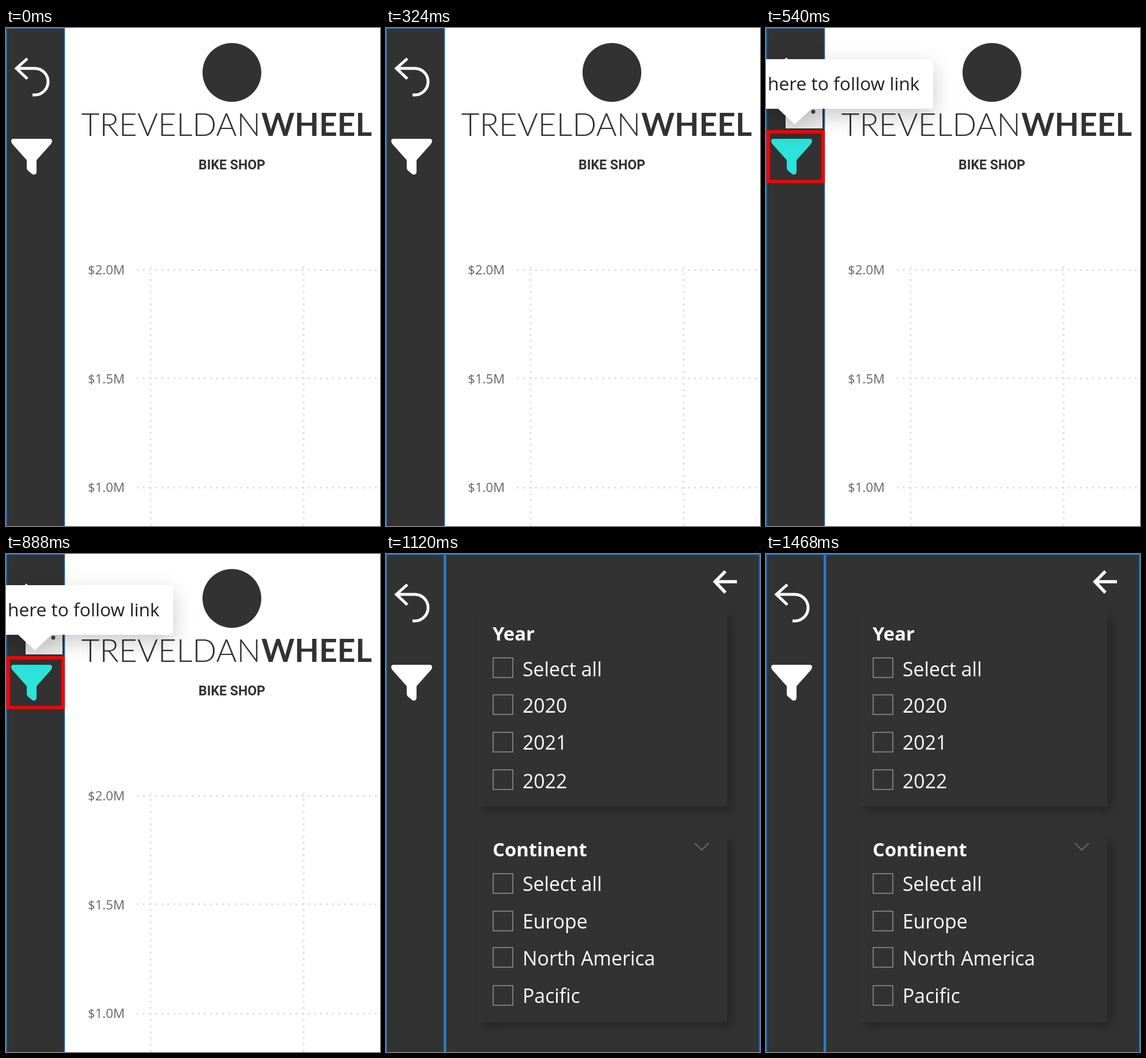
An HTML page with a canvas for the animation above (1.7 s loop, 649 by 863 pixels).

```html
<!DOCTYPE html>
<html lang="en">
<head>
<meta charset="utf-8">
<title>Report filter pane</title>
<style>
  html, body { margin: 0; width: 100%; height: 100%; overflow: hidden; background: #fff; }
  canvas { display: block; width: 649px; height: 863px; }
</style>
</head>
<body>
<canvas width="649" height="863"></canvas>
<script>
const W = 649, H = 863, LOOP = 1700;
const HOVER_AT = 540, PANE_AT = 1120;
const DARK = '#323232', BLUE = '#1068c4', CYAN = '#2ce2d9';
const SANS = '"Open Sans", "Noto Sans", sans-serif';
const ctx = document.querySelector('canvas').getContext('2d');

function rect(x, y, w, h, color) {
  ctx.fillStyle = color;
  ctx.fillRect(x, y, w, h);
}

function text(str, x, y, font, color, align = 'left') {
  ctx.font = font;
  ctx.fillStyle = color;
  ctx.textAlign = align;
  ctx.fillText(str, x, y);
}

function stroke(path, color, width) {
  ctx.strokeStyle = color;
  ctx.lineWidth = width;
  ctx.stroke(new Path2D(path));
}

function withShadow(color, blur, dx, dy, draw) {
  ctx.save();
  ctx.shadowColor = color;
  ctx.shadowBlur = blur;
  ctx.shadowOffsetX = dx;
  ctx.shadowOffsetY = dy;
  draw();
  ctx.restore();
}

function undoIcon() {
  stroke('M37 53 L18 70 L37 88 M18 70 H50 A23 23 0 0 1 50 116 H46', '#fff', 5);
}

function funnelIcon(color) {
  ctx.fillStyle = color;
  ctx.fill(new Path2D(
    'M13 192 H76 Q80 192 80 196 Q80 198 78 201 L53 229 V249 Q53 254 48 254 ' +
    'Q46 254 44 252 L38 247 Q36 245 36 242 V229 L11 201 Q9 198 9 196 Q9 192 13 192 Z'));
}

function sidebar(funnelColor) {
  rect(0, 0, 102, H, DARK);
  rect(0, 0, 102, 1.5, BLUE);
  rect(0, 0, 2, H, BLUE);
  rect(100.5, 0, 1.8, H, BLUE);
  undoIcon();
  funnelIcon(funnelColor);
}

function brand() {
  ctx.fillStyle = DARK;
  ctx.beginPath();
  ctx.arc(392, 77, 51, 0, Math.PI * 2);
  ctx.fill();
  text('TREVELDAN', 442, 187, '300 55px Lato, sans-serif', DARK, 'right');
  text('WHEEL', 443, 187, 'bold 55px Lato, sans-serif', DARK);
  text('BIKE SHOP', 392, 245, 'bold 23px Roboto, sans-serif', DARK, 'center');
}

function chartGrid() {
  ctx.save();
  ctx.setLineDash([3, 7.6]);
  for (const x of [251, 516.5]) stroke(`M${x} 414 V${H}`, '#dedede', 3);
  for (const y of [419.5, 607, 796.5]) stroke(`M227 ${y} H645`, '#dedede', 3);
  ctx.restore();
  ['$2.0M', '$1.5M', '$1.0M'].forEach((label, i) =>
    text(label, 142, 427 + i * 188.5, `22.2px ${SANS}`, '#666'));
}

function tooltip() {
  rect(34, 130, 64, 44, '#eee');
  ctx.fillStyle = '#444';
  ctx.beginPath();
  ctx.arc(82, 145, 3.5, 0, Math.PI * 2);
  ctx.fill();
  withShadow('rgba(0,0,0,.22)', 36, 0, 12, () => {
    ctx.fillStyle = '#fff';
    ctx.fill(new Path2D(
      'M-10 54 H285 Q290 54 290 59 V135 Q290 140 285 140 H79 L50 167 L21 140 H-10 Z'));
  });
  text('here to follow link', 3, 108, `31.7px ${SANS}`, '#202020');
}

function report(hover) {
  rect(0, 0, W, H, '#fff');
  brand();
  chartGrid();
  sidebar(hover ? CYAN : '#fff');
  if (hover) {
    tooltip();
    ctx.strokeStyle = '#f00';
    ctx.lineWidth = 6;
    ctx.strokeRect(4, 180, 95, 86);
  }
}

function slicer(title, titleY, top, bottom, items) {
  withShadow('rgba(0,0,0,.22)', 14, 9, 9, () => rect(160, top, 432, bottom - top, DARK));
  text(title, 185, titleY, `bold 32.8px ${SANS}`, '#fff');
  for (const [label, boxY, baseline] of items) {
    ctx.strokeStyle = '#7c7a78';
    ctx.lineWidth = 2;
    ctx.strokeRect(186, boxY + 1, 34, 34);
    text(label, 237, baseline, `33.8px ${SANS}`, '#fff');
  }
}

function filterPane() {
  rect(0, 0, W, H, DARK);
  slicer('Year', 150, 100, 437, [
    ['Select all', 179, 212], ['2020', 243, 275], ['2021', 308, 339], ['2022', 373, 406]]);
  slicer('Continent', 524, 487, 811, [
    ['Select all', 553, 584], ['Europe', 618, 649], ['North America', 681, 713], ['Pacific', 747, 778]]);
  stroke('M536 501 L548 513 L560 501', '#686868', 2);
  stroke('M589 30 L571 48 L589 67 M571 48 H609', '#fff', 5.5);
  undoIcon();
  funnelIcon('#fff');
  rect(100, 0, 4.5, H, '#2a7bc7');
  ctx.strokeStyle = BLUE;
  ctx.lineWidth = 2;
  ctx.strokeRect(1, 1, W - 2, H + 4);
}

function frame(now) {
  const t = now % LOOP;
  if (t < PANE_AT) report(t >= HOVER_AT);
  else filterPane();
  requestAnimationFrame(frame);
}
requestAnimationFrame(frame);
</script>
</body>
</html>
```
